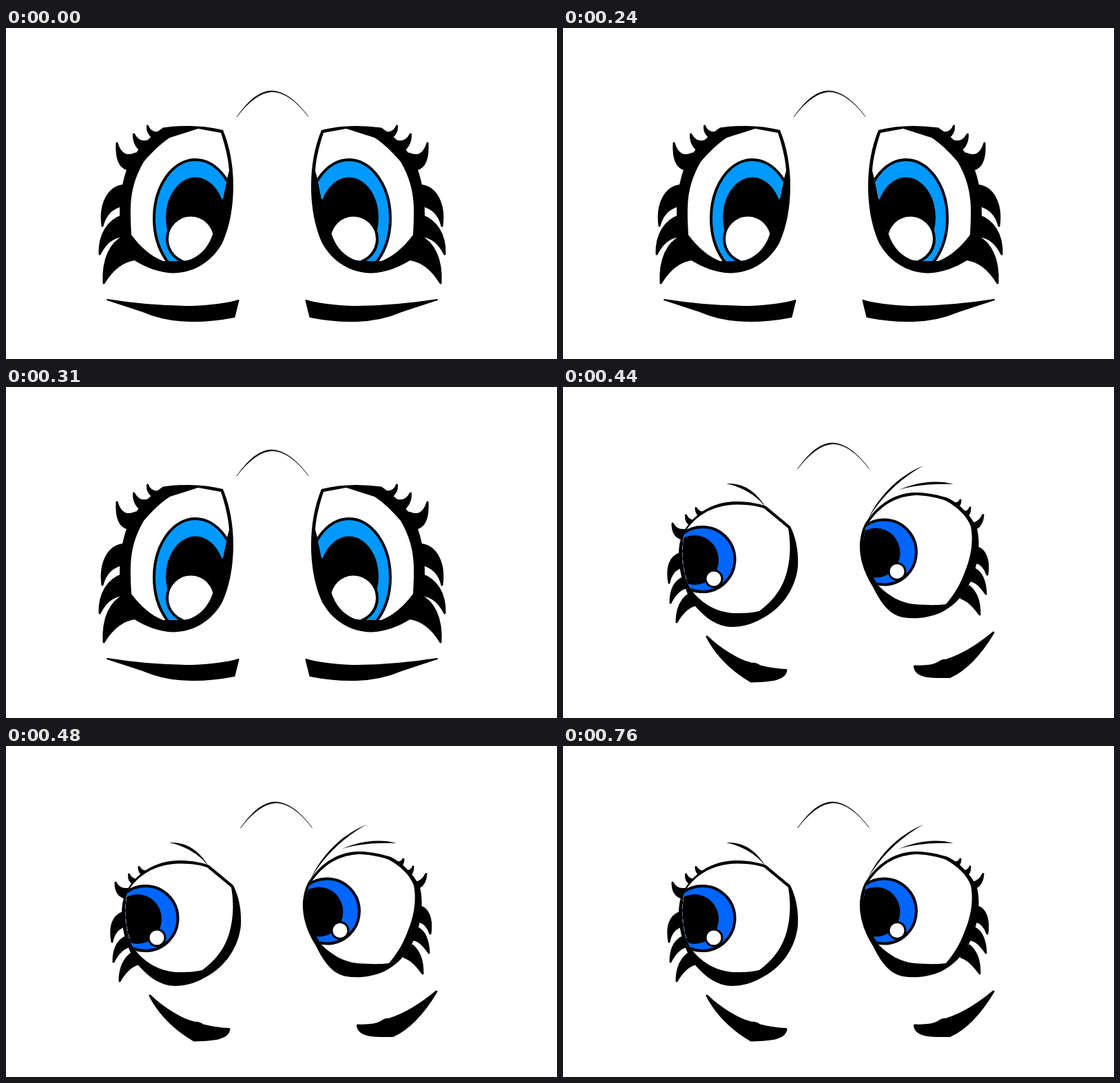
Write an HTML page that moves like this. It is 800 px wide and 480 px high and loops after 880 ms.

```html
<!DOCTYPE html>
<html lang="en">
<head>
<meta charset="utf-8">
<title>Glancing eyes</title>
<style>
  html, body { margin: 0; width: 100%; height: 100%; overflow: hidden; background: #fff; }
  svg { display: block; width: 100%; height: 100%; }
  .lash { stroke: #000; stroke-width: 3; stroke-linejoin: round; }
  .white { fill: #fff; }
  .ring { stroke: #000; stroke-width: 4; }
  .tip { stroke: #000; stroke-width: 2; stroke-linejoin: round; }
  .seam { fill: none; stroke: #000; stroke-width: 2; }
</style>
</head>
<body>
<svg viewBox="0 0 800 480">
  <defs>
    <path id="arch" d="M335 129Q361 91 386 91Q412 92 439 128.500Q411 92.600 386 92.600Q362 94 335 129Z" stroke="#000" stroke-width=".5"/>
    <path id="openShape" d="M279 146L312 152C318 170 323 190 324 207L320 222L315 247L301 296C295 318 278 337 255 338L228 338C210 331 195 317 182 300C180 260 178 232 200 194C212 180 225 167 238 159Z"/>
    <path id="leftShape" d="M176 213C188 190 215 170.500 253 170.500C271 170.500 284 173 292 176L327 205C330 222 331 242 326 264C320 292 304 311 285 325C272 328 262 328 247 328C222 326 203 314 190 299C178 285 173 262 173 240Z"/>
    <path id="rightShape" d="M440 203C456 175 482 157 515 157C532 158 546 161 556 165C574 175 586 187 592 202C596 222 593 244 585 264C578 284 569 300 556 315C540 317 526 316 510 315C490 313 473 303 458 288C444 270 435 248 435 228Z"/>
    <clipPath id="openClip"><use href="#openShape"/></clipPath>
    <clipPath id="leftClip"><use href="#leftShape"/></clipPath>
    <clipPath id="rightClip"><use href="#rightShape"/></clipPath>

    <g id="downEye">
      <path d="M228 144.500Q276 138 315 148C325 172 330 200 330 229C330 262 324 290 314 312C300 337 275 355 243 355.500C222 355 203 347 188 338C172 325 164 300 165 272C165 245 169 222 176 203C186 180 205 160 228 144.500Z"/>
      <g class="lash">
        <path d="M205.500 142C205 149 208 155 214 159L222 152Q209 153 205.500 142Z"/>
        <path d="M185.500 154C185 165 190 174 197 178L206 164Q193 168 185.500 154Z"/>
        <path d="M161 167C160 186 164 202 177 205L188 182Q168 191 161 167Z"/>
        <path d="M140 287C136 257 147 229 174 228L170 257Q146 262 140 287Z"/>
        <path d="M136 328C135 300 148 279 170 272L168 302Q148 304 136 328Z"/>
        <path d="M142 370C140 335 152 311 172 302L190 335Q161 338 142 370Z"/>
      </g>
      <use href="#openShape" class="white"/>
      <g clip-path="url(#openClip)">
        <ellipse class="ring" cx="275" cy="276" rx="60" ry="85" fill="#0099ff"/>
        <ellipse cx="275" cy="275" rx="43" ry="58.500"/>
        <ellipse class="ring white" cx="268.500" cy="306" rx="34.500" ry="34.500"/>
      </g>
      <path class="seam" d="M315 248L302 293"/>
      <path class="tip" d="M147 394Q210 404 270 404Q315 402 337.500 395L331.500 419C285 428 240 429 199 411Z"/>
    </g>

    <g id="sideIris">
      <ellipse class="ring" cx="202.500" cy="250" rx="47" ry="47" fill="#0066ff"/>
      <ellipse cx="191" cy="251" rx="35" ry="36"/>
    </g>
    <circle id="glint" class="white" r="12" stroke="#000" stroke-width="3"/>
  </defs>

  <g id="down">
    <use href="#arch"/>
    <use href="#downEye"/>
    <use href="#downEye" transform="matrix(-1 0 0 1 773 0)"/>
  </g>

  <g id="side" visibility="hidden">
    <use href="#arch" x="5.500" y="-10"/>

    <path d="M174 212C188 186 215 166 252 166C270 166 284 169 295 173L330 202C339 220 342 240 341 260C338 292 318 320 292 334C277 343 262 348 244 348C224 347 208 336 193 319C178 300 168 272 168 242C168 231 170 221 174 212Z"/>
    <g class="lash">
      <path d="M193 175.500Q193 182 198 187L203 182Q197 182 193 175.500Z"/>
      <path d="M178.500 186Q178 197 186 200L191 194Q182 194 178.500 186Z"/>
      <path d="M159 198Q159 216 172 220L179 207Q165 210 159 198Z"/>
      <path d="M154 284C150 260 156 246 171 241L172 261Q157 266 154 284Z"/>
      <path d="M156 313C156 294 163 281 176 276L181 290Q166 293 156 313Z"/>
      <path d="M165 341C165 320 173 306 186 298L192 316Q177 320 165 341Z"/>
    </g>
    <use href="#leftShape" class="white"/>
    <g clip-path="url(#leftClip)">
      <use href="#sideIris"/>
      <use href="#glint" x="219" y="278"/>
    </g>
    <path d="M175 218Q170 248 180 282" fill="none" stroke="#fff" stroke-width=".5" stroke-dasharray="7 4"/>
    <path d="M237 140Q272 138 294 174Q273 148 237 140Z"/>
    <path class="lash" d="M209 362C229 381 255 397 273 401Q281 401 286 405Q306 410 324 410.500C322 424 304 426 273 427C246 411 223 389 209 362Z"/>

    <path d="M438 199C455 172 480 153 514 153C532 153.500 546 157 559 161C577 170 591 186 600 202C606 220 604 245 598 266C589 294 574 314 549 327C530 335 512 337 493 334C473 330 461 312 450 290C437 270 430 248 431 226C432 216 434 207 438 199Z"/>
    <g class="lash">
      <path d="M577 164Q577 172 571 175L567 169Q574 170 577 164Z"/>
      <path d="M591 175Q591 185 585 188L580 181Q588 183 591 175Z"/>
      <path d="M610 185.500Q609 200 600 205L594 198Q604 198 610 185.500Z"/>
      <path d="M616 272C619 250 613 237 602 233L599 254Q611 257 616 272Z"/>
      <path d="M614 300C613 280 608 269 598 264L592 281Q602 282 614 300Z"/>
      <path d="M605 330C605 308 599 297 590 289L578 306Q591 310 605 330Z"/>
    </g>
    <use href="#rightShape" class="white"/>
    <g clip-path="url(#rightClip)">
      <use href="#sideIris" x="263.500" y="-10.500"/>
      <use href="#glint" x="485" y="267.500"/>
    </g>
    <path class="seam" d="M435 216C434 246 443 268 454 283"/>
    <path d="M524 113.500C492 127 463 151 443 191Q473 142 524 113.500Z"/>
    <path d="M487 149.500C512 138 542 134 567 141C543 140 514 141 487 149.500Z"/>
    <path class="lash" d="M625 356C607 386 587 409 562 420.500C535 421 512 421 510.500 405Q535 406 545 400Q550 396 557 396Q589 386 625 356Z"/>
  </g>
</svg>
<script>
  const LOOP = 880, GLANCE = 440;
  const down = document.getElementById("down");
  const side = document.getElementById("side");
  const show = (group, on) => group.setAttribute("visibility", on ? "visible" : "hidden");

  function draw(ms) {
    const glancing = ms % LOOP >= GLANCE;
    show(down, !glancing);
    show(side, glancing);
  }

  const start = performance.now();
  function tick() {
    draw(performance.now() - start);
    requestAnimationFrame(tick);
  }
  tick();
</script>
</body>
</html>
```
